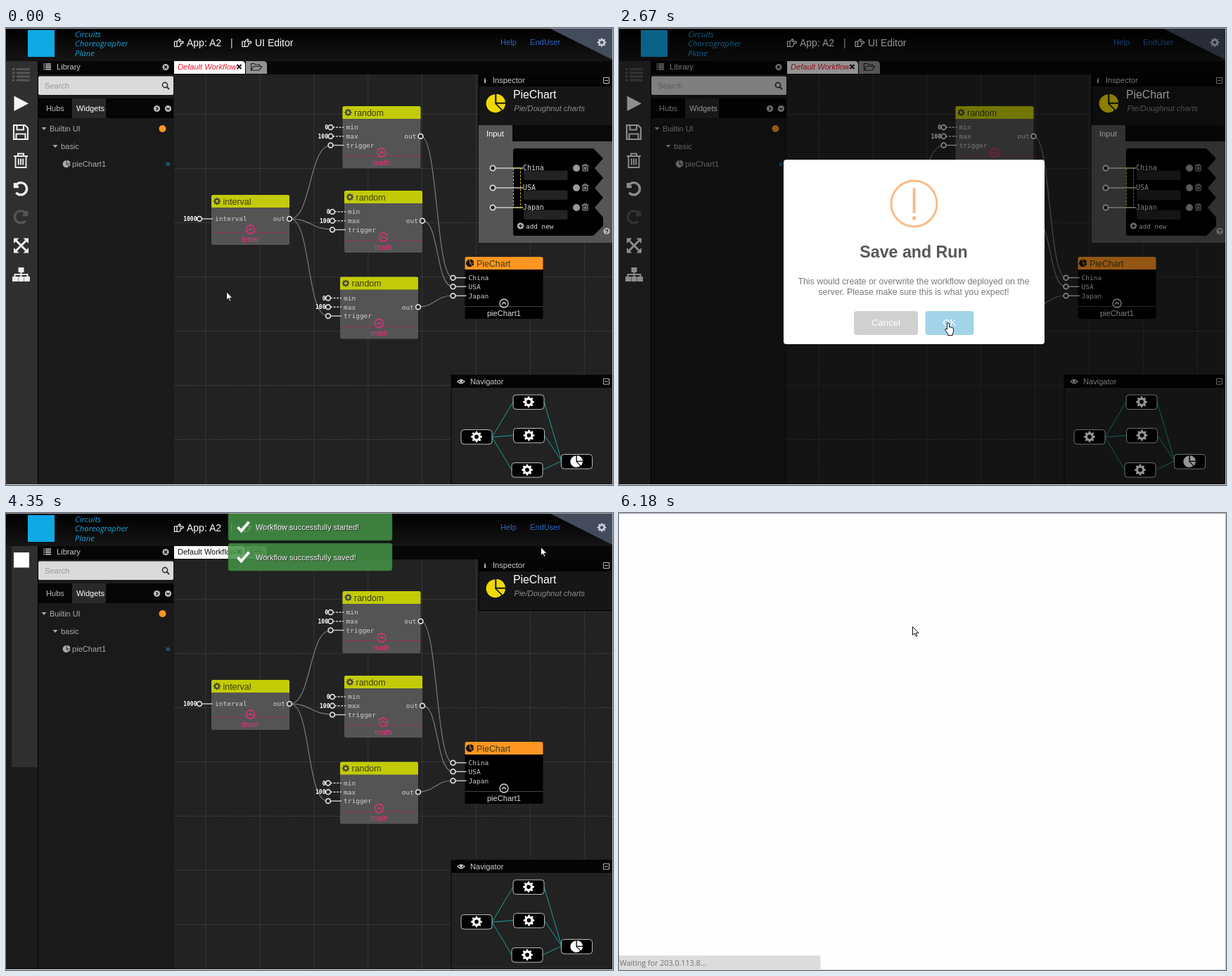
Recreate the animation shown at these times as an HTML page. Size 863 by 649 pixels, loop 8000 ms.

```html
<!DOCTYPE html>
<html lang="en">
<head>
<meta charset="utf-8">
<title>Workflow editor</title>
<style>
html, body { margin: 0; width: 100%; height: 100%; overflow: hidden; background: #fff; }
svg { display: block; width: 863px; height: 649px; font-family: "Liberation Sans", Arial, sans-serif; }
text { white-space: pre; }
.mono { font-family: "DejaVu Sans Mono", monospace; }
.ui { font-family: "Open Sans", sans-serif; }
</style>
</head>
<body>
<svg id="stage" viewBox="0 0 863 649" xmlns="http://www.w3.org/2000/svg"></svg>
<script>
const LOOP = 8000;
const ADDRESS = "203.0.113.8";

// ---- drawing helpers
const rect = (x, y, w, h, fill, more = "") =>
  `<rect x="${x}" y="${y}" width="${w}" height="${h}" fill="${fill}" ${more}/>`;
const text = (x, y, s, size, fill, more = "") =>
  `<text x="${x}" y="${y}" font-size="${size}" fill="${fill}" ${more}>${s}</text>`;
const mono = (x, y, s, size, fill, more = "") => text(x, y, s, size, fill, `class="mono" ${more}`);
const dot = (x, y, r, fill, more = "") => `<circle cx="${x}" cy="${y}" r="${r}" fill="${fill}" ${more}/>`;
const fillPath = (d, fill, more = "") => `<path d="${d}" fill="${fill}" ${more}/>`;
const line = (d, color, w = 1, more = "") =>
  `<path d="${d}" fill="none" stroke="${color}" stroke-width="${w}" ${more}/>`;
const at = (x, y, body, more = "") => `<g transform="translate(${x} ${y})" ${more}>${body}</g>`;
const group = (id, body, more = "") => `<g id="${id}" ${more}>${body}</g>`;
const middle = 'text-anchor="middle"';
const right = 'text-anchor="end"';

// ---- icons
function gear(x, y, r, fill) {
  let d = "";
  for (let i = 0; i < 32; i++) {
    const a = (i - 0.5) * Math.PI / 16;
    const k = i % 4 < 2 ? r : r * 0.74;
    d += (i ? "L" : "M") + (x + k * Math.cos(a)).toFixed(2) + " " + (y + k * Math.sin(a)).toFixed(2);
  }
  const h = r * 0.36;
  d += `ZM${x - h} ${y}a${h} ${h} 0 1 0 ${2 * h} 0a${h} ${h} 0 1 0 ${-2 * h} 0Z`;
  return fillPath(d, fill, 'fill-rule="evenodd"');
}
const pie = (x, y, r, fill) => `<g transform="translate(${x} ${y}) scale(${r})">` +
  fillPath("M-.06 -.95A.97 .97 0 1 0 .62 .73L-.06 .05ZM.1 -1A1 1 0 0 1 1.05 -.1H.1ZM.12 .05H1.05A1 1 0 0 1 .77 .7Z", fill) + "</g>";
const ring = (x, y, r = 3.4) => dot(x, y, r, "#222", 'stroke="#d8d8d8" stroke-width="1.8"');
const chevron = (x, y, c) => at(x, y,
  dot(0, 0, 6, "none", `stroke="${c}" stroke-width="1.3"`) + line("M-3 1.5L0 -1.5 3 1.5", c, 1.3));
const trash = (x, y, c, k = 1) => `<g transform="translate(${x} ${y}) scale(${k})">` +
  line("M-10 -6.5H10M-4 -7V-10H4V-7M-7.5 -6V9.5H7.5V-6M-3.2 -3V6M0 -3V6M3.2 -3V6", c, 1.9) + "</g>";
const bullets = (x, y, w, gap, c) => [0, 1, 2, 3].map(i =>
  rect(x, y + i * gap, w * 0.14, gap * 0.6, c) + rect(x + w * 0.24, y + i * gap, w * 0.76, gap * 0.6, c)).join("");
const finger = (x, y) => at(x, y,
  line("M.5 4.5H4V12H.5ZM4 5L7.5 1.2 9 2 7.7 4.7H12.5q1.6 1.2 0 2.3H9.5q1 1.2 -.2 2 .3 1.3 -.8 1.7 -.2 1.4 -1.5 1.3H4", "#fff", 1.2));
const caret = (x, y) => fillPath(`M${x} ${y}h7l-3.5 4z`, "#aaa");
const minimize = (x, y) => line(`M${x} ${y}h8v8h-8zM${x + 1.5} ${y + 4}h5`, "#bbb");
const badge = (x, y, d, r = 4.6) => dot(x, y, r, "#bbb") + at(x, y, line(d, "#111", 1.4));

// ---- page parts
function header() {
  return rect(0, 1, 862, 46, "url(#top)") +
    fillPath("M774 1H862V45Z", "#434b5c") + gear(847, 20.5, 6.5, "#c8ccd4") +
    rect(31, 3, 38, 38, "#0fa9e6") +
    ["Circuits", "Choreographer", "Plane"].map((s, i) =>
      text(98, 12.5 + i * 13.7, s, 11.4, "#1aa0d8", 'class="ui" font-style="italic"')).join("") +
    finger(239, 14.5) + text(257, 26, "App: A2", 14, "#fff") +
    text(319, 26, "|", 14, "#ddd") +
    finger(335.5, 14.5) + text(354, 26, "UI Editor", 14, "#fff") +
    text(703, 24, "Help", 11.2, "#2f66c4") +
    text(745, 24, "EndUser", 11.1, "#2f66c4", 'id="user"');
}

function toolbar() {
  const w = "#eee";
  const undo = "M-8.5 -8V-2.5H-3M-8 -3A8.6 8.6 0 1 1 -6.6 5.8";
  const tools = at(21, 66, bullets(-12, -9, 25, 5.2, "#555")) +
    fillPath("M11.5 96.5V118L32 107.2Z", "#f4f4f4") +
    at(21, 148, line("M-10 -10H6L10 -6V10H-10ZM-5.5 -10V-3.5H4V-10M-6.5 10V2.5H6.5V10", w, 2.1)) +
    trash(21, 188.5, w) +
    at(21, 228, line(undo, w, 3.4)) +
    at(21, 268, line(undo, "#555", 3.4, 'transform="scale(-1 1)"')) +
    at(21.5, 309, line("M-8 -8L8 8M8 -8L-8 8", w, 3) +
      [0, 90, 180, 270].map(a => fillPath("M-10.5 -10.5H-3L-10.5 -3Z", w, `transform="rotate(${a})"`)).join("")) +
    at(21.5, 350, rect(-4, -10, 8, 7, w) + line("M0 -3V4M-9 4V0H9V4", w, 2) +
      [-12.5, -4, 4.5].map(x => rect(x, 3, 8, 7, w)).join(""));
  return rect(0, 47, 45, 601, "#2f2f2f") + group("tools", tools) +
    group("stop", rect(11, 56, 22, 21.5, "#fff"));
}

function library() {
  return rect(45, 47, 1, 601, "#000") + rect(46, 47, 193, 601, "#1a1a1a") + rect(46, 47, 193, 19, "#060606") +
    bullets(53.5, 50.5, 10.5, 2.5, "#ccc") + text(72, 59, "Library", 11.1, "#ccc") +
    badge(227, 55.5, "M-2 -2L2 2M2 -2L-2 2") +
    rect(46, 68.5, 192, 26.5, "#dadada", 'rx="2"') + text(55, 86, "Search", 11.1, "#999") +
    dot(226, 81, 3.6, "none", 'stroke="#333" stroke-width="1.6"') + line("M228.7 83.7L232 87", "#333", 2) +
    rect(46, 100, 192, 28, "#060606") + rect(94, 100, 48, 28, "#292929") +
    text(57, 118, "Hubs", 11.1, "#bbb") + text(100, 118, "Widgets", 11.1, "#fff") +
    badge(214.5, 114.5, "M-1 -2.2L1.3 0 -1 2.2") + badge(230.5, 114.5, "M-2.2 -1L0 1.3 2.2 -1") +
    caret(50.5, 141) + text(62, 147, "Builtin UI", 10.9, "#aaa") + dot(222.5, 143, 5, "#ff9424") +
    caret(66.5, 166) + text(78, 172, "basic", 11, "#aaa") +
    pie(86, 193, 5.3, "#aaa") + text(94, 197, "pieChart1", 11.1, "#aaa") +
    text(226.5, 197, "»", 13, "#2196d0", 'id="more"');
}

function board() {
  let grid = "";
  for (let i = 0; i < 8; i++) grid += `M${284 + i * 76.9} 66V648`;
  for (let i = 0; i < 7; i++) grid += `M239 ${122.5 + i * 77}H862`;
  return rect(239, 47, 623, 601, "#222") + line(grid, "#484848", 1, 'stroke-dasharray="1.5 1.5"') +
    rect(239, 47, 623, 19, "#070707");
}

function tabs() {
  return fillPath("M239 47H335Q340 47 340 52V65H239Z", "#fff") +
    fillPath("M341 47H366Q371 47 371 52V65H341Z", "#929292") +
    line("M348.5 60V50.5H353L354.5 52H360.5V54.5M348.5 60L352 54.5H363.5L360 60Z", "#222", 1.2) +
    text(244, 59, "Default Workflow", 11.1, "#f0142d", 'id="draft" font-style="italic"') +
    text(244, 59, "Default Workflow", 11, "#111", 'id="saved"') +
    line("M328.5 52L334.5 58M334.5 52L328.5 58", "#111", 2);
}

const wire = (x1, y1, x2, y2, k) =>
  line(`M${x1} ${y1}C${x1 + k} ${y1} ${x2 - k} ${y2} ${x2} ${y2}`, "#7b7b7b", 1.2);

function frame(title, w, h, head, body, edge) {
  return rect(0, 0, w, h, body, 'rx="2.5"') + fillPath(`M0 18V2.5Q0 0 2.5 0H${w - 2.5}Q${w} 0 ${w} 2.5V18Z`, head) +
    text(16.5, 13.6, title, 12.4, "#3c3c10") + line(`M0 ${h - 17.5}H${w}`, edge);
}
const port = (y, label, value) =>
  line(`M-14 ${y}H2`, "#ccc", 1.4, value ? 'stroke-dasharray="3 1.6"' : "") + ring(-17, y) +
  (value ? mono(-20.5, y + 3, value, 8, "#fff", `font-weight="bold" ${right}`) : "") +
  mono(5, y + 3.3, label, 9.5, "#d0d0d0");
const out = y => mono(105, y + 3.3, "out", 9.5, "#d0d0d0", right) + ring(111, y);
const foot = (h, label) => chevron(55.5, h - 22, "#e8307c") +
  text(55.5, h - 4.5, label, 11, "#e8307c", middle);

function random(x, y) {
  return at(x, y, frame("random", 111, 88, "#c2cb05", "#545454", "#8f3555") + gear(8, 9, 5.3, "#444") +
    port(30, "min", "0") + port(42.7, "max", "100") + port(55.5, "trigger") + out(42.7) + foot(88, "math"));
}
function flow() {
  return wire(404, 271, 461, 167, 30) + wire(404, 271, 464, 286, 30) + wire(404, 271, 457, 409, 30) +
    wire(590, 154, 635, 354.5, 24) + wire(592, 273, 635, 367, 24) + wire(586, 396, 635, 380, 24) +
    at(292, 237, frame("interval", 111, 71, "#c2cb05", "#545454", "#8f3555") + gear(8, 9, 5.3, "#444") +
      port(34, "interval", "1000").replace('stroke-dasharray="3 1.6"', "") + out(34) + foot(71, "timer")) +
    random(478.5, 111) + random(481, 231) + random(475, 353.5) +
    at(652.5, 325, frame("PieChart", 111, 88, "#ff9621", "#000", "#444") + pie(7, 9, 5.4, "#111") +
      port(29.7, "China") + port(42.3, "USA") + port(55.3, "Japan") +
      chevron(55.5, 66, "#ddd") + text(55.5, 83.5, "pieChart1", 11.1, "#ddd", middle));
}

function inspector() {
  let rows = "", edge = "M724 171H835";
  ["China", "USA", "Japan"].forEach((name, i) => {
    const y = 199 + i * 28;
    edge += `L849 ${y - 14}L837 ${y}`;
    rows += line(`M695 ${y}H735`, "#ccc", 1.3) + ring(692, y, 3.6) +
      rect(736, y + 3.5, 62.5, 13.5, "#232323", 'rx="2"') + mono(735, y + 2.5, name, 9.9, "#ddd") +
      dot(811, y, 5, "#999") + trash(823.5, y - 0.5, "#bbb", 0.47);
  });
  edge += "L849 269V281L835 295H724Q721 295 721 292V174Q721 171 724 171Z";
  const detail = rect(672, 138, 190, 23, "#0a0a0a") + rect(672, 138, 48, 24, "#555") +
    text(683, 154, "Input", 11.2, "#fff") + rect(672, 161, 190, 144, "#555") +
    fillPath(edge, "#000") + rows + line("M721.5 198.5H731.5V255.5H721.5Z", "#d8c400", 1, 'stroke-dasharray="3 2"') +
    badge(731.5, 281, "M-2.5 0H2.5M0 -2.5V2.5") + mono(739, 284.5, "add new", 9.4, "#ddd") +
    dot(854, 288.5, 4.6, "#bbb") + text(854, 291.8, "?", 9, "#222", `font-weight="bold" ${middle}`);
  return rect(672, 65, 190, 74, "#161616") + rect(672, 65, 190, 18, "#040404") +
    text(679.5, 77.5, "i", 11, "#ddd", 'font-family="Liberation Serif, serif" font-weight="bold"') +
    text(692, 78, "Inspector", 11.1, "#ccc") + minimize(849.5, 70.5) +
    pie(696, 107, 13.3, "#eed900") + text(721, 100, "PieChart", 15.8, "#fff") +
    text(722.5, 118, "Pie/Doughnut charts", 11.1, "#8a8a8a", 'font-style="italic"') +
    line("M672 65V138.5H862", "#000") + group("detail", detail);
}

function navigator() {
  const hubs = [[743, 531], [743.5, 578.5], [741, 627.5]];
  const box = (x, y) => rect(x - 22, y - 10, 44, 20.5, "#000", 'rx="4" stroke="#bbb"');
  return rect(633, 493, 229, 155, "#222", 'stroke="#050505"') + rect(633, 493, 229, 18, "#040404") +
    line("M642 502Q647 496.5 652 502Q647 507 642 502Z", "#ccc", 1.2) + dot(647, 501.5, 2, "#ccc") +
    text(660, 505.5, "Navigator", 11.1, "#ccc") + minimize(849.5, 498) +
    hubs.map(([x, y]) => line(`M691 581L${x - 22} ${y}M${x + 22} ${y}L790 615`, "#1c9c9c")).join("") +
    [...hubs, [669, 580.5]].map(([x, y]) => box(x, y) + gear(x, y, 8, "#fff")).join("") +
    box(811.5, 615.5) + pie(811, 615.5, 8.5, "#fff");
}

const toast = (y, word) =>
  rect(316, y, 233, 39, "#459247", 'rx="3" fill-opacity=".92" stroke="#2d6b30" stroke-opacity=".6"') +
  line(`M329.5 ${y + 20}L334.5 ${y + 25.5}L345.5 ${y + 12.5}`, "#fff", 4) +
  text(355, y + 24, `Workflow successfully ${word}!`, 11, "#fff", 'style="text-shadow:1px 1px 1px #333"');

function dialog() {
  const grey = "#7a7a7a";
  return rect(234, 187, 371, 262, "#fff", 'rx="4"') +
    group("alert", dot(419.5, 249.5, 32.5, "none", 'stroke="currentColor" stroke-width="3"') +
      rect(417.7, 227, 3.8, 36.5, "currentColor", 'rx="1.9"') + dot(419.6, 270, 2.7, "currentColor")) +
    text(419, 326, "Save and Run", 23.2, "#575757", `font-weight="bold" ${middle}`) +
    text(419, 364, "This would create or overwrite the workflow deployed on the", 12.4, grey, middle) +
    text(419, 378.5, "server. Please make sure this is what you expect!", 12.4, grey, middle) +
    rect(334, 402, 91, 34, "#d0d0d0", 'rx="4"') + text(379.5, 423, "Cancel", 13.2, "#fff", middle) +
    rect(435.5, 402, 69, 34, "#aedef4", 'rx="4" id="ok"') + text(470, 423, "OK", 13.2, "#fff", middle);
}

const ARROW = "M.5 .5V12.4L3.2 9.9 5.2 14.2 7 13.4 5.1 9.3H8.9Z";
const HAND = "M3.5 10V2.1a1.5 1.5 0 0 1 3 0V6.8q1.5 -.7 2.3 .4 1.5 -.5 2.1 .7 1.6 -.2 1.7 1.4V13.5L11.2 16V18.5H4.6V16.3L.8 11.4Q.4 9.4 2 9.4Z";

const stage = document.getElementById("stage");
stage.innerHTML =
  `<defs><linearGradient id="top" x2="0" y2="1"><stop stop-color="#000"/><stop offset="1" stop-color="#151515"/></linearGradient></defs>` +
  group("app", board() + tabs() + header() + toolbar() + library() + flow() + inspector() + navigator() +
    group("shade", rect(0, 47, 8, 601, "#000") + rect(8, 361, 37, 287, "#000"), 'opacity=".42"') +
    group("toasts", toast(0, "started") + toast(43, "saved")) +
    rect(0, 1, 862, 647, "#000", 'id="dim"') + group("dialog", dialog())) +
  group("blank", rect(0, 0, 863, 649, "#fefefe")) +
  rect(0, 0, 863, 1, "#a0a0a0") + rect(862, 0, 1, 649, "#bbb") + rect(0, 648, 863, 1, "#dcdcdc") +
  group("status", fillPath("M0 628.5H283.5Q286.5 628.5 286.5 631.5V649H0Z", "#dcdcdc") +
    text(1, 642.5, "", 10.7, "#737373", 'id="url" class="ui"')) +
  `<path id="cursor" fill="#fff" stroke="#111"/>`;

// ---- timeline
const el = Object.fromEntries([...stage.querySelectorAll("[id]")].map(n => [n.id, n]));
const show = (node, on) => node.setAttribute("opacity", Number(on));
const stepAt = (table, t) => table.reduce((last, row) => row[0] <= t ? row : last);

// time, x, y, hand
const POINTER = [
  [0, 313, 374], [500, 250, 271], [640, 222, 193], [760, 189, 119], [900, 125, 98], [1030, 60, 88],
  [1160, 22, 104], [1730, 164, 194], [1890, 300, 305], [2020, 432, 389], [2160, 448, 406, 1],
  [2280, 463, 418, 1], [2820, 467, 418], [3560, 477, 397], [3690, 540, 325], [3820, 599, 236],
  [3970, 650, 180], [4100, 695, 128], [4230, 730, 85], [4350, 760, 48], [4480, 776, 20, 1],
  [4630, 774, 21, 1], [5150, 778, 22], [5820, 690, 60], [5940, 580, 110], [6060, 470, 150], [6180, 417, 161]
];
// time, backdrop, dialog opacity, dialog scale, icon colour
const MODAL = [
  [0, 0, 0, 1, "#f8d486"], [1310, .2, .6, .85, "#f8d486"], [1430, .42, 1, 1.035, "#f9cf86"],
  [1580, .42, 1, .98, "#f8c886"], [1730, .42, 1, 1, "#f8c486"], [2670, .42, 1, 1, "#f8bb86"],
  [2820, .16, 0, 1, "#f8bb86"], [2970, 0, 0, 1, "#f8bb86"]
];
const TOASTS = [[0, 0], [2970, .5], [3120, .94]];
const STATUS = [[0, 0], [4630, .5], [4760, 1], [5150, 0], [5550, 1]];

function draw(t) {
  const [, x, y, hand] = stepAt(POINTER, t);
  el.cursor.setAttribute("d", hand ? HAND : ARROW);
  el.cursor.setAttribute("transform", `translate(${x} ${y})`);

  const [, dim, alpha, scale, tint] = stepAt(MODAL, t);
  show(el.dim, dim);
  show(el.dialog, alpha);
  el.dialog.setAttribute("transform", `translate(419.5 318) scale(${scale}) translate(-419.5 -318)`);
  el.alert.setAttribute("color", tint);
  el.ok.setAttribute("fill", t < 2670 ? "#aedef4" : "#a3d4ea");

  const running = t >= 2820;
  for (const id of ["tools", "draft", "detail"]) show(el[id], !running);
  for (const id of ["stop", "saved"]) show(el[id], running);
  show(el.shade, t >= 2970 && t < 4630 ? .42 : 0);
  show(el.more, t < 760 || t >= 1730);
  show(el.toasts, stepAt(TOASTS, t)[1]);
  el.user.setAttribute("fill", t >= 4480 ? "#23477c" : "#2f66c4");

  show(el.blank, t >= 5150);
  show(el.status, stepAt(STATUS, t)[1]);
  el.url.textContent = t < 5150 ? ADDRESS + ":4100" : `Waiting for ${ADDRESS}...`;
}

const start = performance.now();
function tick() {
  draw((performance.now() - start) % LOOP);
  requestAnimationFrame(tick);
}
tick();
</script>
</body>
</html>
```
